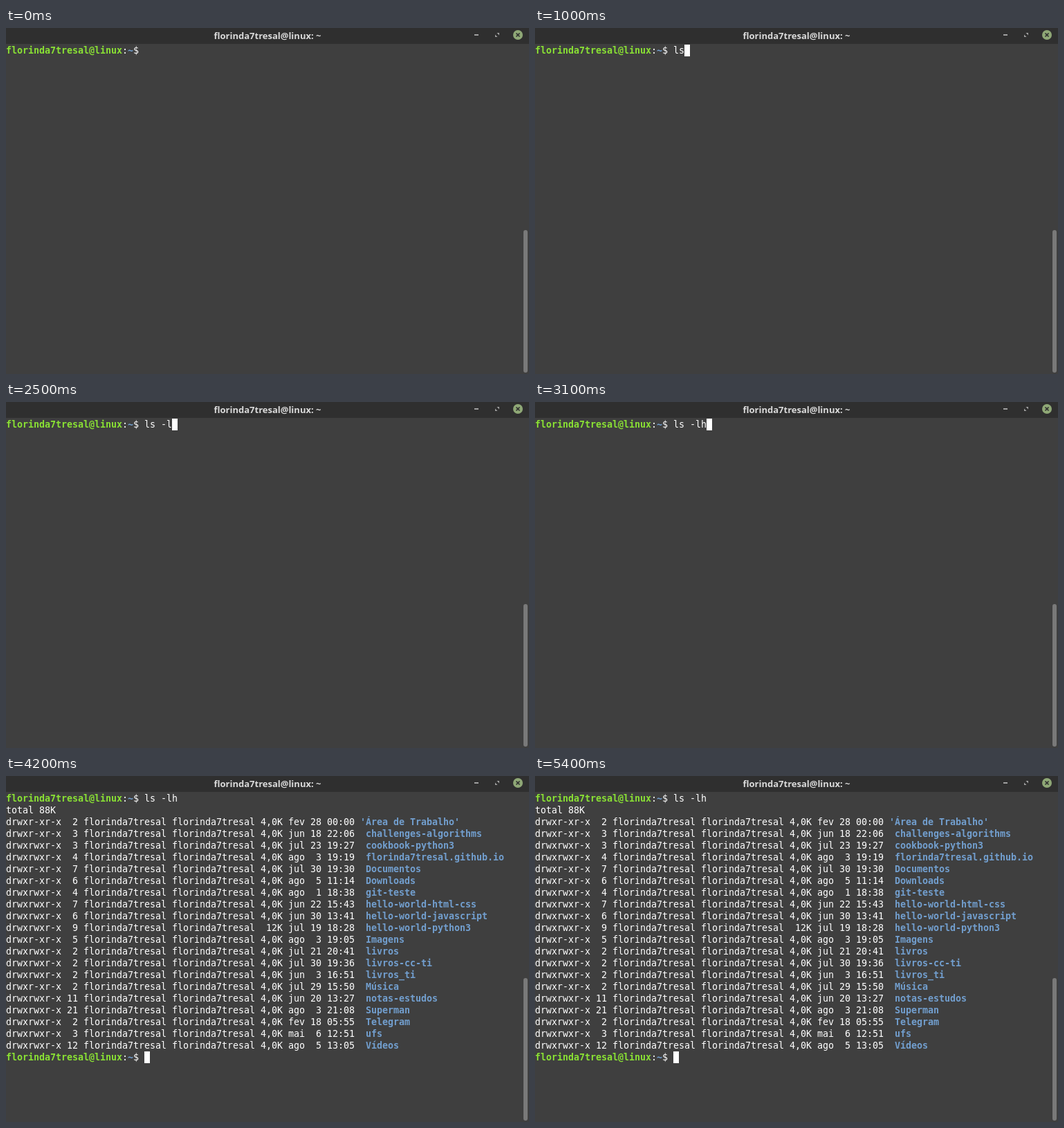
An HTML page for the animation above (6 s loop, 756 by 500 pixels).

```html
<!DOCTYPE html>
<html lang="pt">
<head>
<meta charset="utf-8">
<title>Terminal</title>
<style>
html, body { margin: 0; width: 100%; height: 100%; overflow: hidden; background: #3f3f3f; }
svg { display: block; }
.cell { font: 13.333px "DejaVu Sans Mono", monospace; fill: #fff; white-space: pre; }
.user { font-weight: bold; fill: #8ae234; }
.dir { font-weight: bold; fill: #729fcf; }
.title { font: 600 13px "Noto Sans", "Open Sans", sans-serif; fill: #dadada; text-anchor: middle; }
</style>
</head>
<body>
<svg width="756" height="500" viewBox="0 0 756 500">
  <rect width="756" height="500" fill="#3f3f3f"/>
  <rect width="756" height="23" fill="#2f2f2f"/>
  <text class="title" id="title" x="378" y="16"></text>
  <rect x="677" y="9" width="6" height="2" fill="#a0a0a0"/>
  <path d="M709.5 7H713V10.5ZM707 9.5V13H710.5Z" fill="#a0a0a0"/>
  <circle cx="740" cy="10" r="7" fill="#8fa876"/>
  <path d="M737.5 7.5L742.5 12.5M742.5 7.5L737.5 12.5" stroke="#2f2f2f" stroke-width="1.7"/>
  <rect x="748" y="292" width="6" height="206" rx="3" fill="#797979"/>
  <g id="screen"></g>
  <g id="listing"></g>
  <rect id="cursor" width="8" height="17" fill="#fff"/>
</svg>
<script>
const NS = "http://www.w3.org/2000/svg";
const CW = 8, CH = 17, TOP = 24, LOOP = 6000;
const user = "florinda7tresal", host = user + "@linux", command = "ls -lh";
const promptCols = host.length + 4;
const $ = id => document.getElementById(id);

// permissions | links | size | date | name
const entries = `
drwxr-xr-x|2|4,0K|fev 28 00:00|'Área de Trabalho'
drwxr-xr-x|3|4,0K|jun 18 22:06|challenges-algorithms
drwxrwxr-x|3|4,0K|jul 23 19:27|cookbook-python3
drwxrwxr-x|4|4,0K|ago  3 19:19|${user}.github.io
drwxr-xr-x|7|4,0K|jul 30 19:30|Documentos
drwxr-xr-x|6|4,0K|ago  5 11:14|Downloads
drwxrwxr-x|4|4,0K|ago  1 18:38|git-teste
drwxrwxr-x|7|4,0K|jun 22 15:43|hello-world-html-css
drwxrwxr-x|6|4,0K|jun 30 13:41|hello-world-javascript
drwxrwxr-x|9|12K|jul 19 18:28|hello-world-python3
drwxr-xr-x|5|4,0K|ago  3 19:05|Imagens
drwxrwxr-x|2|4,0K|jul 21 20:41|livros
drwxrwxr-x|2|4,0K|jul 30 19:36|livros-cc-ti
drwxrwxr-x|2|4,0K|jun  3 16:51|livros_ti
drwxr-xr-x|2|4,0K|jul 29 15:50|Música
drwxrwxr-x|11|4,0K|jun 20 13:27|notas-estudos
drwxrwxr-x|21|4,0K|ago  3 21:08|Superman
drwxrwxr-x|2|4,0K|fev 18 05:55|Telegram
drwxrwxr-x|3|4,0K|mai  6 12:51|ufs
drwxrwxr-x|12|4,0K|ago  5 13:05|Vídeos`.trim().split("\n").map(line => line.split("|"));

// Text on the terminal's character grid
function put(parent, col, row, text, style = "") {
  const el = document.createElementNS(NS, "text");
  el.setAttribute("class", "cell " + style);
  el.setAttribute("x", [...text].map((_, i) => (col + i) * CW).join(" "));
  el.setAttribute("y", TOP + row * CH + 13);
  el.textContent = text;
  parent.appendChild(el);
  return el;
}

function prompt(parent, row) {
  const n = host.length;
  put(parent, 0, row, host, "user");
  put(parent, n, row, ":");
  put(parent, n + 1, row, "~", "dir");
  put(parent, n + 2, row, "$");
}

$("title").textContent = host + ": ~";
prompt($("screen"), 0);
const typed = put($("screen"), promptCols, 0, command);

const listing = $("listing");
put(listing, 0, 1, "total 88K");
entries.forEach(([mode, links, size, date, name], i) => {
  const info = [mode, links.padStart(2), user, user, size.padStart(4), date].join(" ");
  put(listing, 0, i + 2, info);
  put(listing, name[0] === "'" ? 64 : 65, i + 2, name, "dir");
});
const lastRow = entries.length + 2;
prompt(listing, lastRow);

const keyTimes = [600, 1000, 1600, 2100, 2500, 3100];
const blinkTimes = [500, 3600, 4200, 4800, 5400];
const enterTime = 4200;
const passed = (times, t) => times.filter(x => t >= x).length;

function draw(t) {
  const chars = passed(keyTimes, t), done = t >= enterTime;
  const text = command.slice(0, chars);
  if (typed.textContent !== text) typed.textContent = text;
  listing.style.display = done ? "" : "none";
  const cursor = $("cursor");
  cursor.setAttribute("x", (promptCols + (done ? 0 : chars)) * CW);
  cursor.setAttribute("y", TOP + (done ? lastRow : 0) * CH);
  cursor.style.display = passed(blinkTimes, t) % 2 ? "" : "none";
}

const start = performance.now();
function tick() {
  draw((performance.now() - start) % LOOP);
  requestAnimationFrame(tick);
}
tick();
</script>
</body>
</html>
```
